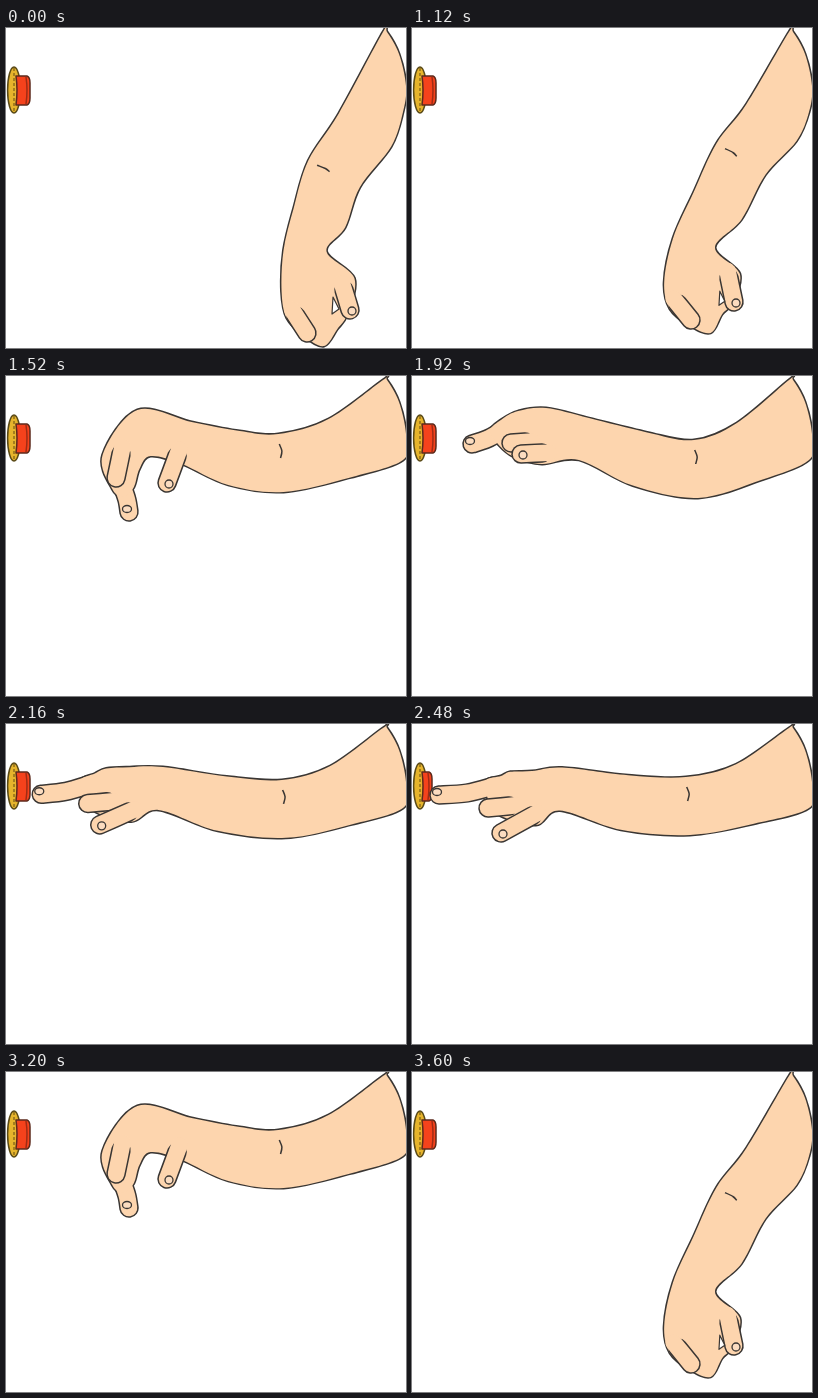
Animation, 400 px wide and 320 px high, one loop 3.68 s. Source, as an HTML page:

```html
<!DOCTYPE html>
<html lang="en">
<head>
<meta charset="utf-8">
<title>Arm pressing a button</title>
<style>
  html, body { margin: 0; width: 100%; height: 100%; overflow: hidden; background: #fff; }
  svg { display: block; width: 100%; height: 100%; }
  path, ellipse { fill: none; stroke: #3a3633; stroke-width: 1.5; stroke-linejoin: round; }
  .ink, .flesh { stroke-linecap: round; }
  .ink { stroke-width: 19.5; }
  .flesh { stroke: #fdd5ae; stroke-width: 16.5; }
  #bodyInk { stroke-width: 3; }
  #body { fill: #fdd5ae; stroke: none; }
  #gap { fill: #fff; stroke-width: 1.2; }
  .nail { fill: #fbdcc0; stroke-width: 1.3; }
  #plate { fill: #e6b42c; stroke: #5a4a18; }
  #rim { stroke: #7a5c14; stroke-width: 1.2; stroke-dasharray: 3 2; }
  #knob { fill: #f5421c; stroke: #5c2a1c; }
  #face { stroke: #a02c14; }
</style>
</head>
<body>
<svg viewBox="0 0 400 320">
  <ellipse id="plate" cx="8" cy="62" rx="6.4" ry="23"/>
  <path id="rim" d="M8 40V84"/>
  <path id="knob"/>
  <path id="face"/>
  <path id="indexInk" class="ink"/>
  <path id="bodyInk"/>
  <path id="index" class="flesh"/>
  <ellipse id="indexNail" class="nail" rx="4.5" ry="3.5"/>
  <path id="body"/>
  <path id="curlInk" class="ink"/>
  <path id="curl" class="flesh"/>
  <path id="thumbInk" class="ink"/>
  <path id="thumb" class="flesh"/>
  <ellipse id="thumbNail" class="nail" rx="4" ry="4"/>
  <path id="gap"/>
  <path id="crease"/>
</svg>
<script>
const HOLD = 1120, STEP = 80, LOOP = 3680, LAST = 33;
const SHOULDER = [390, 48];
const CAP = [[397, 84], [400, 58], [393, 26], [381, 4], [377, 4]];

// Joints: elbow, wrist, palm, knuckle, end of hand,
// index middle and tip, curled finger, thumb. "wide" is half the palm.
const poses = [
  { at: 0, wide: 37, joints: '328,146 299,223 312,257 311,288 315,305 308,285 312,298 290,288 301,305 338,262 344,282' },
  { at: 1, wide: 38, joints: '329,131 282,215 290,250 289,278 294,292 288,272 293,288 266,276 279,292 317,250 322,274' },
  { at: 6, wide: 24, joints: '275,87 181,67 138,57 115,86 117,112 121,124 123,136 115,78 110,102 171,80 161,107' },
  { at: 11, wide: 28, joints: '284,93 172,63 132,60 104,58 88,56 75,63 60,68 113,66 99,67 130,77 109,78' },
  { at: 15, wide: 27, joints: '276,82 149,65 122,74 92,69 82,62 55,69 27,71 97,82 76,84 120,92 89,109' }
];
for (const p of poses) p.joints = p.joints.split(' ').map(s => s.split(',').map(Number));

const el = id => document.getElementById(id);
const put = (id, d) => el(id).setAttribute('d', d);
const fmt = p => p.map(v => v.toFixed(1)).join(' ');
const mix = (a, b, u) => a + (b - a) * u;
const add = (p, d, k = 1) => [p[0] + d[0] * k, p[1] + d[1] * k];
const unit = (a, b) => {
  const x = b[0] - a[0], y = b[1] - a[1], l = Math.hypot(x, y) || 1;
  return [x / l, y / l];
};
const middle = (a, b) => [mix(a[0], b[0], 0.5), mix(a[1], b[1], 0.5) + 5];

// Blend two points along an arc around the shoulder.
function swing(a, b, u) {
  const polar = p => {
    const x = p[0] - SHOULDER[0], y = p[1] - SHOULDER[1];
    return [Math.hypot(x, y), (Math.atan2(y, x) + 2 * Math.PI) % (2 * Math.PI)];
  };
  const [ra, ta] = polar(a), [rb, tb] = polar(b);
  const r = mix(ra, rb, u), t = mix(ta, tb, u);
  return add(SHOULDER, [Math.cos(t), Math.sin(t)], r);
}

// Smooth curve through the points.
function curve(pts, closed) {
  const n = pts.length;
  const at = i => closed ? pts[(i + n) % n] : pts[Math.max(0, Math.min(n - 1, i))];
  const ctrl = (p, a, b, k) => add(p, [b[0] - a[0], b[1] - a[1]], k);
  let d = 'M' + fmt(pts[0]);
  for (let i = 0; i < (closed ? n : n - 1); i++) {
    const p = at(i), q = at(i + 1);
    d += 'C' + [ctrl(p, at(i - 1), q, 1 / 6), ctrl(q, p, at(i + 2), -1 / 6), q].map(fmt).join(' ');
  }
  return closed ? d + 'Z' : d;
}

// Outline of the arm: both sides of a chain of joints with given half widths.
function drawArm([elbow, wrist, palm, knuckle, end], wide) {
  const chain = [SHOULDER, middle(SHOULDER, elbow), elbow, middle(elbow, wrist), wrist, palm, knuckle, end];
  const half = [0, 31, 29, 27.5, 21.5, wide, wide * 0.82, wide * 0.45];
  const upper = [], lower = [];
  for (let i = 1; i < chain.length; i++) {
    const [x, y] = unit(chain[i - 1], chain[i + 1] || chain[i]);
    upper.push(add(chain[i], [-y, x], half[i]));
    lower.unshift(add(chain[i], [y, -x], half[i]));
  }
  const tip = add(end, unit(knuckle, end), wide * 0.36);
  const d = curve([...upper, tip, ...lower, ...CAP], true);
  put('bodyInk', d);
  put('body', d);

  const side = unit(elbow, upper[1]);
  put('crease', curve([add(elbow, side, 19), add(add(elbow, side, 12), [2, 0]), add(elbow, side, 5)]));
}

// A finger on top of the hand, left open at its base.
function drawFinger(id, base, tip) {
  put(id + 'Ink', curve([base, tip]));
  put(id, curve([add(base, unit(tip, base), 7), tip]));
}

function drawNail(id, [x, y]) {
  el(id).setAttribute('cx', x);
  el(id).setAttribute('cy', y);
}

function drawKnob(front) {
  const edge = front - 3;
  put('knob', `M10 48H${edge}Q${front} 49 ${front} 55V70Q${front} 76 ${edge} 77H10Q12 62 10 48Z`);
  put('face', `M${edge - 1} 49Q${edge + 1} 62 ${edge - 1} 76`);
}

function draw(step) {
  let i = 0;
  while (i < poses.length - 2 && step >= poses[i + 1].at) i++;
  const a = poses[i], b = poses[i + 1];
  const u = Math.min(1.12, (step - a.at) / (b.at - a.at));
  const joints = a.joints.map((p, j) => swing(p, b.joints[j], u));
  const [end, bend, tip, curlBase, curlTip, thumbBase, thumbTip] = joints.slice(4);

  drawArm(joints, mix(a.wide, b.wide, u));
  const index = curve([end, bend, tip]);
  put('indexInk', index);
  put('index', index);
  drawFinger('curl', curlBase, curlTip);
  drawFinger('thumb', thumbBase, thumbTip);
  drawNail('indexNail', add(tip, [-2, -3]));
  drawNail('thumbNail', add(thumbTip, [2, 1]));

  const open = Math.max(0, 1 - step / 6);
  const gap = [[-17, -13], [-11, -1], [-18, 4]].map(o => add(thumbTip, o, open));
  put('gap', open ? 'M' + gap.map(fmt).join('L') + 'Z' : '');
  drawKnob(Math.min(24, tip[0] - 7));
}

let shown = -1;
const start = performance.now();
function tick() {
  const t = (performance.now() - start) % LOOP;
  const k = t < HOLD ? 0 : 1 + Math.floor((t - HOLD) / STEP);
  const step = Math.min(k, LAST - k);
  if (step !== shown) draw(shown = step);
  requestAnimationFrame(tick);
}
tick();
</script>
</body>
</html>
```
